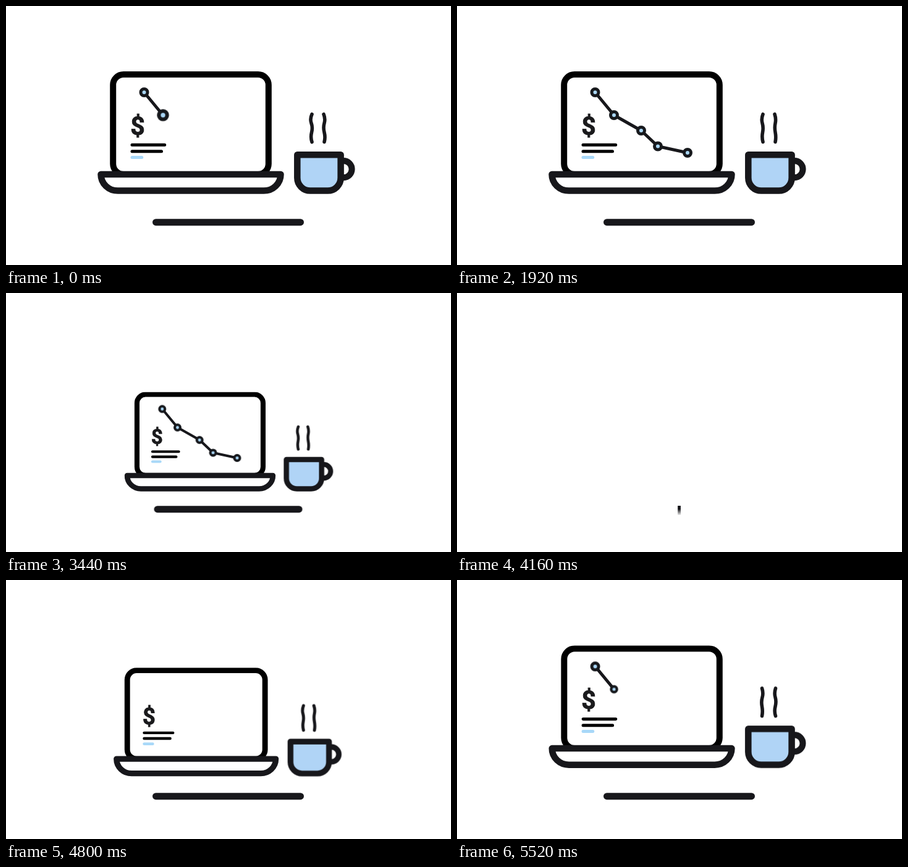
An HTML page without scripts that plays this animation: 720 by 420 pixels, repeating every 5600 ms.

```html
<!DOCTYPE html>
<html lang="en">
<head>
<meta charset="utf-8">
<title>Laptop and cup</title>
<style>
  html, body { margin: 0; width: 100%; height: 100%; overflow: hidden; background: #fff; }
  svg { display: block; width: 100vw; height: 100vh; }

  .ink { fill: none; stroke: #17171b; stroke-width: 10.5; stroke-linejoin: round; stroke-linecap: round; }
  .thin { stroke: #000; stroke-width: 5; stroke-linecap: round; }
  .sign { font: 700 41px Roboto, Arial, sans-serif; fill: #1a1a1c; stroke: #1a1a1c; stroke-width: .9; text-anchor: middle; }

  .desk { animation: desk 5.6s infinite; }
  .ground { stroke-width: 11; transform-origin: 359.5px 350.7px; animation: ground 5.6s infinite; }
  .steam { stroke-width: 5.6; animation: steam 5.6s step-end infinite; }

  /* The chart starts over while the desk is out of sight */
  .line { stroke-width: 5; stroke-linecap: butt; stroke-dasharray: 185 190; animation: draw 5.6s -1.36s linear infinite; }
  .dot {
    r: 5.5px; fill: #a9d6f6; stroke: #17191d; stroke-width: 5;
    transform-box: fill-box; transform-origin: center;
    animation: 5.6s -1.36s ease-out infinite;
  }

  @keyframes desk {
    0%, 59.286% { transform: scale(1); transform-origin: 378px 394px; animation-timing-function: cubic-bezier(.37, 0, .63, 1); }
    66.786% { transform: scale(0); transform-origin: 378px 394px; }
    78.571% { transform: scale(0); transform-origin: 375px 423px; animation-timing-function: linear; }
    81.429% { transform: scale(.486); transform-origin: 375px 423px; animation-timing-function: cubic-bezier(.3, .5, .7, .82); }
    85.714% { transform: scale(.885); transform-origin: 375px 423px; animation-timing-function: cubic-bezier(.3, .57, .6, 1); }
    90.714% { transform: scale(1.0144); transform-origin: 375px 423px; animation-timing-function: ease-in-out; }
    95.714% { transform: scale(.997); transform-origin: 375px 423px; animation-timing-function: ease-in-out; }
    100% { transform: scale(1); transform-origin: 375px 423px; }
  }
  @keyframes ground {
    0%, 60% { transform: scaleX(1); animation-timing-function: cubic-bezier(.37, 0, .63, 1); }
    75.714% { transform: scaleX(0); animation-timing-function: cubic-bezier(.37, 0, .63, 1); }
    82.5%, 100% { transform: scaleX(1); }
  }
  @keyframes steam {
    0%, 12.857%, 25.714%, 38.571%, 51.429%, 64.286%, 77.143%, 90% {
      d: path("M495 175.5Q491.5 183 494 190T494.5 205T495 220.5M514 175.5Q517 183 515 190T515 205T515 220.5");
    }
    4.286%, 17.143%, 30%, 42.857%, 55.714%, 68.571%, 81.429%, 94.286%, 98.571% {
      d: path("M493.5 175.5Q496 183 494 190T493.5 205T493.5 220.5M515.5 175.5Q513 183 515 190T515 205T515.5 220.5");
    }
    8.571%, 21.429%, 34.286%, 47.143%, 60%, 72.857%, 85.714% {
      d: path("M495 175.5Q492 183 494 190T494.5 205T495 220.5M514 175.5Q516.5 183 515 190T515 205T515 220.5");
    }
  }
  @keyframes draw {
    0%, 15.27% { stroke-dashoffset: 185; }
    47.34%, 100% { stroke-dashoffset: 0; }
  }
  @keyframes pop1 { 0%, 14.64% { transform: scale(0); } 17.5% { transform: scale(1.22); } 20.35%, 100% { transform: scale(1); } }
  @keyframes pop2 { 0%, 21.43% { transform: scale(0); } 24.29% { transform: scale(1.22); } 27.14%, 100% { transform: scale(1); } }
  @keyframes pop3 { 0%, 30.36% { transform: scale(0); } 33.22% { transform: scale(1.22); } 36.07%, 100% { transform: scale(1); } }
  @keyframes pop4 { 0%, 37% { transform: scale(0); } 39.86% { transform: scale(1.22); } 42.71%, 100% { transform: scale(1); } }
  @keyframes pop5 { 0%, 45.71% { transform: scale(0); } 48.57% { transform: scale(1.22); } 51.43%, 100% { transform: scale(1); } }
</style>
</head>
<body>
<svg viewBox="0 0 720 420">
  <clipPath id="above"><rect width="720" height="351"/></clipPath>
  <g clip-path="url(#above)">
    <g class="desk">
      <rect x="173.2" y="111" width="251.6" height="162" rx="17" fill="#fff" stroke="#000" stroke-width="10"/>
      <path class="ink" style="fill:#fff" d="M153.5 273H444.5C444.5 288 432 299.6 417 299.6H181C166 299.6 153.5 288 153.5 273Z"/>

      <text class="sign" x="213" y="209.3">$</text>
      <path class="thin" d="M204 225.3H256.7M204 235.7H251.5"/>
      <path class="thin" style="stroke:#a8d8f8" d="M204 245.5H219.7"/>

      <path class="ink line" pathLength="185" d="M223.5 140L254 177L298 202L325 227.5L373 238"/>
      <circle class="dot" style="animation-name:pop1" cx="223.5" cy="140"/>
      <circle class="dot" style="animation-name:pop2" cx="254" cy="177"/>
      <circle class="dot" style="animation-name:pop3" cx="298" cy="202"/>
      <circle class="dot" style="animation-name:pop4" cx="325" cy="227.5"/>
      <circle class="dot" style="animation-name:pop5" cx="373" cy="238"/>

      <path class="ink" style="stroke-width:10" d="M541 251H546a13.6 13.6 0 0 1 0 27.2H541"/>
      <path class="ink" style="fill:#b0d4f6" d="M471.3 241.2H541.6V278.6a21 21 0 0 1 -21 21H492.3a21 21 0 0 1 -21 -21Z"/>
      <path class="ink steam" d="M495 175.5Q491.5 183 494 190T494.5 205T495 220.5M514 175.5Q517 183 515 190T515 205T515 220.5"/>
    </g>
  </g>
  <path class="ink ground" d="M242.5 350.7H476.5"/>
</svg>
</body>
</html>
```
